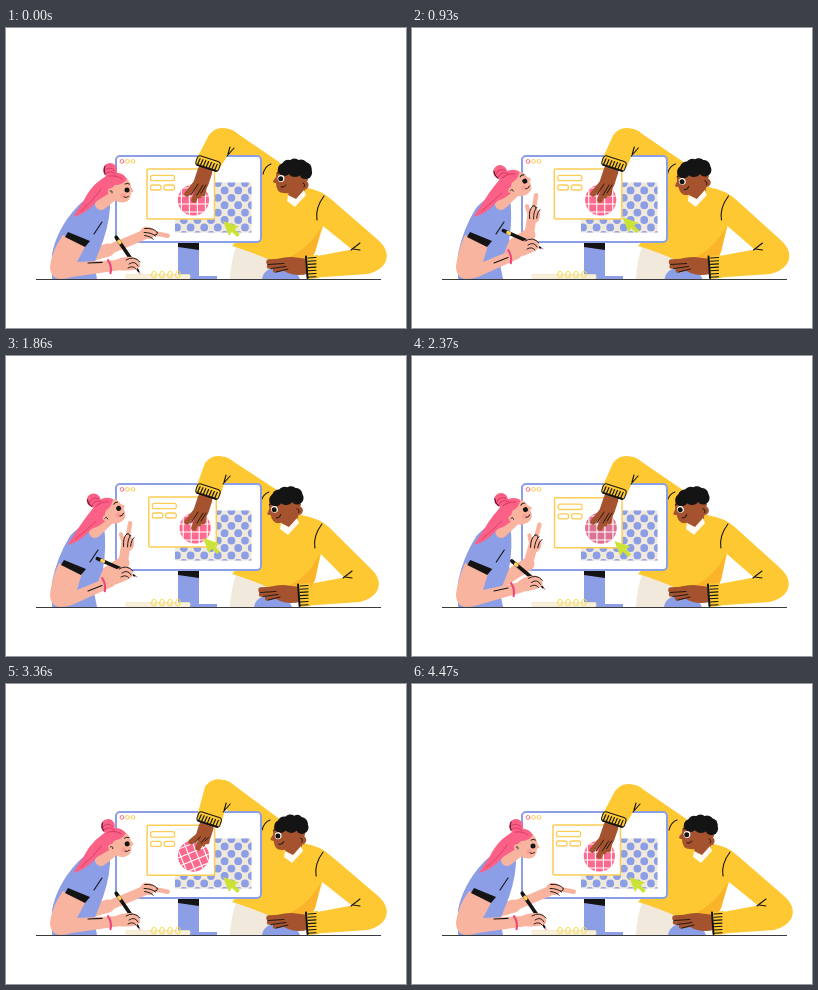
An HTML page with a canvas that plays this animation: 400x300 px, repeating every 4500 ms.

```html
<!DOCTYPE html>
<html lang="en">
<head>
<meta charset="utf-8">
<title>Design review</title>
<style>
html, body { margin: 0; width: 100%; height: 100%; overflow: hidden; background: #fff; }
canvas { display: block; width: 400px; height: 300px; }
</style>
</head>
<body>
<canvas id="stage"></canvas>
<script>
const LOOP = 4500;
const C = {
  blue: '#8c9ee6', skin: '#f9b49f', hair: '#fb6187', deep: '#d93a66', sun: '#fdc832',
  shade: '#fbb429', brown: '#a5532f', ink: '#141414', line: '#fbcd55', sand: '#f1e9dc',
  lime: '#cbe336', pink: '#fb6a8e'
};

const cv = document.getElementById('stage');
const g = cv.getContext('2d');
const dpr = window.devicePixelRatio || 1;
cv.width = 400 * dpr;
cv.height = 300 * dpr;
g.lineCap = g.lineJoin = 'round';

const rad = d => d * Math.PI / 180;
const mix = (a, b, k) => a + (b - a) * k;
const ease = k => (k = Math.min(1, Math.max(0, k)), k * k * (3 - 2 * k));
// Eases up from a to b, holds, eases down from c to d.
const pulse = (t, a, b, c, d) => ease((t - a) / (b - a)) - ease((t - c) / (d - c));

function poseAt(t) {
  const think = pulse(t, 0, 900, 2200, 3300);
  const tilt = pulse(t, 100, 1100, 1900, 4000);
  const look = pulse(t, 200, 1300, 2700, 3900);
  const reach = pulse(t, 2600, 3300, 3300, 3800);
  const swipe = Math.PI * Math.max(0, (t - 2600) / (LOOP - 2600));
  const swing = Math.sin(2 * swipe);
  const sway = -8 * pulse(t, 540, 1400, 1800, 2950);
  return {
    think, sway,
    write: pulse(t, 0, 950, 1900, 2850),
    headX: 112 - 8 * think, headY: 160 - 4.5 * tilt, headR: -32 * tilt,
    blink: t > 2890 && t < 3050,
    manX: -7 * look, manR: -13 * pulse(t, 0, 700, 2700, 3900),
    topX: sway * .5 - 4 * reach, topY: -5 * reach,
    cuffX: 202 + 2 * swing,
    touchX: 188 + 7 * swing, touchY: 173 - 9 * Math.sin(swipe) ** 2,
    cardX: 141 + 1.8 * pulse(t, 200, 1300, 2000, 3600),
    cardY: 141 + 1.3 * pulse(t, 1900, 2700, 2900, 3600),
    ballR: -42 * pulse(t, 3000, 3700, 3750, LOOP),
    arrow: pulse(t, 700, 1300, 2100, 2900),
    press: pulse(t, 1900, 2300, 2450, 2700)
  };
}

function fill(d, color) {
  g.fillStyle = color;
  g.fill(new Path2D(d));
}
function draw(d, color = C.ink, width = 1.1) {
  g.strokeStyle = color;
  g.lineWidth = width;
  g.stroke(new Path2D(d));
}
function dot(x, y, r, color) {
  g.fillStyle = color;
  g.beginPath();
  g.arc(x, y, r, 0, 7);
  g.fill();
}
function ring(x, y, rx, ry, color, width) {
  g.beginPath();
  g.ellipse(x, y, rx, ry, .2, 0, 7);
  g.strokeStyle = color;
  g.lineWidth = width;
  g.stroke();
}
function box(x, y, w, h, r, stroke, width, color) {
  g.beginPath();
  g.roundRect(x, y, w, h, r);
  if (color) { g.fillStyle = color; g.fill(); }
  if (stroke) { g.strokeStyle = stroke; g.lineWidth = width; g.stroke(); }
}
function group(x, y, deg, body) {
  g.save();
  g.translate(x, y);
  g.rotate(rad(deg));
  body();
  g.restore();
}

function screen(p) {
  fill('M172 214H193V248H211V251H172Z', C.blue);
  fill('M172 215H193V222L172 219Z', C.ink);
  box(110, 128, 145, 86, 4, C.blue, 2, '#fff');
  [C.pink, C.line, C.line].forEach((c, i) => ring(116 + i * 5.5, 133.4, 1.9, 1.9, c, 1));

  g.save();
  g.beginPath();
  g.rect(169, 154.5, 76.5, 50);
  g.clip();
  g.fillStyle = C.sand;
  g.fillRect(169, 154, 78, 52);
  for (let r = 0; r < 8; r++)
    for (let c = 0; c < 7; c++)
      dot(171 + c * 13.6 + r % 2 * 6.8, 155 + r * 7.4, 3.9, C.blue);
  g.restore();

  group(p.cardX, p.cardY, 0, () => {
    box(0, 0, 67.5, 50, 1, C.line, 1.5, '#fff');
    box(3.5, 6.3, 24, 5.4, 2, C.line, 1.3);
    box(3.5, 16, 10.5, 5, 2, C.line, 1.3);
    box(17, 16, 10.5, 5, 2, C.line, 1.3);
  });

  group(p.cardX + 46.4, 172, p.ballR, () => {
    dot(0, 0, 15.6, C.pink);
    g.globalAlpha = p.press;
    dot(0, 0, 15.6, '#dc7293');
    g.globalAlpha = 1;
    g.beginPath();
    g.arc(0, 0, 15.6, 0, 7);
    g.clip();
    for (let k = -12; k <= 12; k += 8)
      draw(`M${k} -16V16M-16 ${k}H16`, '#fff', 1.1);
  });
  group(217 - 20 * p.arrow, 193 - 11 * p.arrow, 0, () =>
    fill('M0 0L16 5.5L11.5 8.2L17 13.5L14 16L8.8 10.8L6 15Z', C.lime));
}

function manHead(p) {
  const x = 288 + p.manX, y = 150;
  fill(`M${x - 4} ${y + 8}L${x + 12} ${y + 4}L${x + 10} ${y + 18}L${x + 1} ${y + 24}L${x - 6} ${y + 18}Z`, C.brown);
  fill(`M${x - 6} ${y + 17}L${x + 2} ${y + 21}L${x + 10} ${y + 12}L${x + 12} ${y + 17}L${x + 1} ${y + 29}L${x - 7} ${y + 23}Z`, '#fffaf2');
  group(x, y, p.manR, () => {
    fill('M-16 -9Q-18 -4 -18 -1L-21 3Q-21 5 -18 5Q-18 15 -10 15Q-2 16 6 12L14 2L12 -10Z', C.brown);
    for (let k = 0; k < 6; k++) {
      const a = rad(195 + k * 36);
      dot(1 + 11 * Math.cos(a), -7 + 6 * Math.sin(a), 6.5, C.ink);
    }
    dot(1, -9, 8, C.ink);
    dot(10, 7, 4.6, C.brown);
    draw('M9 5Q12 6 10 9', C.ink, .9);
    dot(-13, .5, 3.4, '#fff');
    dot(-13.3, .8, 2.5, C.ink);
    draw('M-17 -5Q-14 -7 -11 -5M-13 9Q-10 10 -8 7', C.ink, 1);
  });
}

function manBody(p) {
  const e = p.sway, s = p.manX * .3, t = p.topX, v = p.topY;
  fill('M231 217L266 229L264 251H224Q225 230 231 217Z', C.sand);
  fill(`M${256 + e} 251Q${258 + e} 239 ${275 + e} 239Q${290 + e} 240 ${294 + e} 251Z`, C.blue);
  fill(`M${215 + t} ${101 + v}Q${224 + t} ${99 + v} ${232 + t} ${106 + v}L${273 + s} 134L${297 + s} 159
    Q${316 + s} 162 ${326 + s} 172L${371 + e} 211Q${385 + e} 223 ${379 + e} 235Q${374 + e} 243 ${362 + e} 246
    L${311 + e} 249.5V228L${346 + e} 221.5L${317 + s} 198L309 224L304 233L264 232Q243 223 226 218
    Q240 205 247 180L250 146L${218 + t} ${126 + v}Z`, C.sun);
  fill(`M${316 + s} 198L309 224L304 233L278 232Q302 222 ${316 + s} 198Z`, C.shade);
  draw(`M${318 + s} 168Q${309 + s} 180 ${311 + s} 192M${345 + e} 222L${354 + e} 215M${347 + e} 221L${354 + e} 222
    M${257 + s} 146Q${259 + s} 138 ${265 + s} 136`);
}

function finger(x, y, a, b, color, width) {
  draw(`M${x} ${y}L${a} ${b}`, color, width);
}

function forearm(p) {
  const x = p.cuffX, tx = p.touchX, ty = p.touchY, t = p.topX, v = p.topY;
  fill(`M${x - 12} 132L${203 + t} ${107 + v}Q${210 + t} ${98 + v} ${220 + t} ${100.5 + v}L${229 + t} ${108 + v}
    L${223 + t} 125L${x + 12} 140Z`, C.sun);
  draw(`M${221 + t} 128L${228 + t} 120M${222 + t} 126L${224 + t} 119`);

  const px = mix(x - 3, tx, .45), py = mix(142, ty, .42);
  draw(`M${x - 3} 143L${px + 1} ${py}`, C.brown, 15);
  finger(px - 4, py, tx - 7, ty - 7, C.brown, 5.5);
  finger(px + 5, py, tx + 9, ty - 7, C.brown, 5);
  finger(px, py, tx, ty - 1, C.brown, 5.5);
  finger(px + 2, py, tx + 5, ty - 5, C.brown, 5);
  draw(`M${px - 2} ${py + 1}L${tx - 3.2} ${ty - 6}M${px + 3} ${py + 2}L${tx + 3} ${ty - 6}M${px + 6} ${py + 2}L${tx + 7} ${ty - 8}`, C.ink, .9);
  group(x, 135.5, 18, () => {
    box(-12, -5, 24, 10, 3, C.ink, 1, C.sun);
    draw('M-10 4.5H10', C.ink, 1.6);
    for (let k = -9; k <= 9; k += 3) draw(`M${k} -2L${k - .6} 4`, C.ink, 1.2);
  });
}

function restingHand(p) {
  group(p.sway, 0, 0, () => {
    fill('M302 231L286 229Q275 229 266 233L267 241L278 243Q288 249 302 246Z', C.brown);
    finger(284, 233, 263, 234, C.brown, 5.5);
    finger(284, 238, 263, 238.5, C.brown, 4.5);
    finger(284, 239, 269, 242.5, C.brown, 4.5);
    draw('M262 236.5L278 235.5M265 240.5L280 238.5M270 244L282 241', C.ink, .9);
    fill('M299.5 228L312 227L313 250L301 251Z', C.sun);
    draw('M300 228.5L301.5 250', C.ink, 2);
    for (let k = 230; k < 250; k += 3.2) draw(`M302 ${k}L310 ${k - .5}`, C.ink, 1.1);
  });
}

function notebook() {
  box(120, 246.5, 64, 4.5, 1, '#f7e6b4', .7, '#f8f0df');
  for (let i = 0; i < 4; i++) ring(148 + i * 8, 246.5, 2.4, 3.2, '#f5dc45', 1);
}

function womanHead(p) {
  const a = rad(p.headR), cos = Math.cos(a), sin = Math.sin(a);
  const pt = (x, y) => `${p.headX + x * cos - y * sin} ${p.headY + x * sin + y * cos}`;
  const end = 67 - 5.5 * p.think;
  draw(`M${pt(-3, 5)}L${95 - 6 * p.think} 176`, C.skin, 12);
  fill(`M${pt(-6, -14)}Q${pt(-24, -8)} ${end + 11} 172Q${end + 5} 181 ${end} 189
    Q${end + 13} 186 ${end + 24} 173Q${pt(-14, 8)} ${pt(-6, 4)}Z`, C.hair);
  draw(`M${end + 8} 183Q${end + 19} 174 ${pt(-17, 1)}`, C.deep, .9);
  group(p.headX, p.headY, p.headR, () => {
    fill('M-10 -6Q-2 -14 8 -10Q13 -6 13 -1L15.5 3Q15 4.5 13 4.5Q13 14 5 14.5Q-4 15 -9 6Z', C.skin);
    fill('M9 -9Q4 -17 -7 -15Q-16 -12 -16 -3Q-16 6 -9 6Q-7 0 -3 -3Q5 -3 9 -9Z', C.hair);
    dot(-8, -18, 7, C.hair);
    draw('M-14 -17Q-8 -23 -3 -17M-13 -14Q-7 -19 -2 -13M-9 -12Q-1 -13 4 -9', C.deep, 1);
    draw('M-13 -22Q-15 -18 -13 -14', C.ink, .8);
    dot(-7, 3.5, 3.2, C.skin);
    draw('M-8 3Q-5 2 -6 5', C.ink, .8);
    dot(5, 7.5, 2.5, '#fb9c97');
    if (p.blink) draw('M6 2Q9 4 11.5 2', C.ink, 1.1);
    else dot(9, 2, 2.5, C.ink);
    draw('M7 -4Q9 -5.5 11.5 -4M6 9Q8 10.5 10.5 8.5', C.ink, .9);
  });
}

function pointingArm({ think: k }) {
  const ex = mix(102, 117, k), ey = mix(222, 207, k);
  const x = mix(142, 122, k), y = mix(205, 187, k);
  draw(`M88 226L${ex} ${ey}`, C.skin, 13);
  draw(`M${ex} ${ey}L${x - 2} ${y + 1}`, C.skin, 9.5);
  group(x, y, mix(8, -84, k), () => {
    draw(`M-3 -3L${8 * k} ${-3 - 5 * k}`, C.skin, 4);
    box(-8, -6, 15, 12, 6, null, 0, C.skin);
    draw('M0 -1L20 0', C.skin, 4.4);
    draw('M-4 -4Q5 -6 9 -2M-4 0Q4 -1 8 2M-3 3Q4 3 6 5.5M9 -2Q10 1 7 1', C.ink, .9);
  });
}

function womanBody(p) {
  const l = -6 * p.think;
  fill(`M${87 + l} 167Q${96 + l} 172 ${104 + l} 170Q${105 + l * .7} 190 97 213L88 236L91 251H46L46 226
    Q51 201 ${70 + l} 180Q${78 + l} 171 ${87 + l} 167Z`, C.blue);
}

function penArm({ think, write: k }) {
  const x = mix(126, 119, k), y = mix(236, 217, k), l = -4 * think;
  const wx = x - 14, wy = y + 1 + 7 * k;
  fill(`M${57 + l} 207L${80 + l} 217L71 234L${wx} ${wy - 5}L${wx + 3} ${wy + 5}L66 249Q60 251 54 251Q44 250 44 238
    Q46 222 ${57 + l} 207Z`, C.skin);
  fill(`M${62 + l} 204L${84 + l} 213L${79 + l} 219L${59 + l} 209Z`, C.ink);
  draw(`M${88 + l} 206L${96 + l} 194M82 235L96 ${mix(234, wy - 2, .4)}`);
  const bx = mix(62, wx, .82), by = mix(243, wy, .82);
  draw(`M${bx - 1} ${by - 6}Q${bx + 3} ${by} ${bx + 1.5} ${by + 7}`, '#f0487a', 2.2);

  group(x, y, mix(54, 22, k), () => {
    draw('M-31 -3L2 -2', C.ink, 3.6);
    draw('M-26 -2.8H-24.5', C.line, 3.6);
    draw('M2 -2L10 -1', C.ink, 1.8);
    draw('M11 -1L12.5 -1', '#d98bb0', 1.2);
  });
  fill(`M${wx - 3} ${wy - 5}Q${x - 5} ${y - 9} ${x + 4} ${y - 6}Q${x + 9} ${y - 2} ${x + 8} ${y + 3}
    Q${x + 2} ${y + 8} ${wx} ${wy + 5}Z`, C.skin);
  draw(`M${x - 6} ${y - 4}Q${x + 2} ${y - 9} ${x + 8} ${y - 2}M${x - 3} ${y}Q${x + 3} ${y - 4} ${x + 6} ${y + 2}
    M${x - 4} ${y + 4}Q${x + 1} ${y + 1} ${x + 4} ${y + 5}`, C.ink, .9);
}

function render(t) {
  const p = poseAt(t);
  g.setTransform(dpr, 0, 0, dpr, 0, 0);
  g.fillStyle = '#fff';
  g.fillRect(0, 0, 400, 300);
  [manBody, manHead, screen, forearm, restingHand, notebook,
    pointingArm, womanBody, womanHead, penArm].forEach(part => part(p));
  g.fillStyle = '#3a3a3a';
  g.fillRect(30, 251, 345, 1);
}

const start = performance.now();
function tick() {
  render((performance.now() - start) % LOOP);
  requestAnimationFrame(tick);
}
tick();
</script>
</body>
</html>
```
